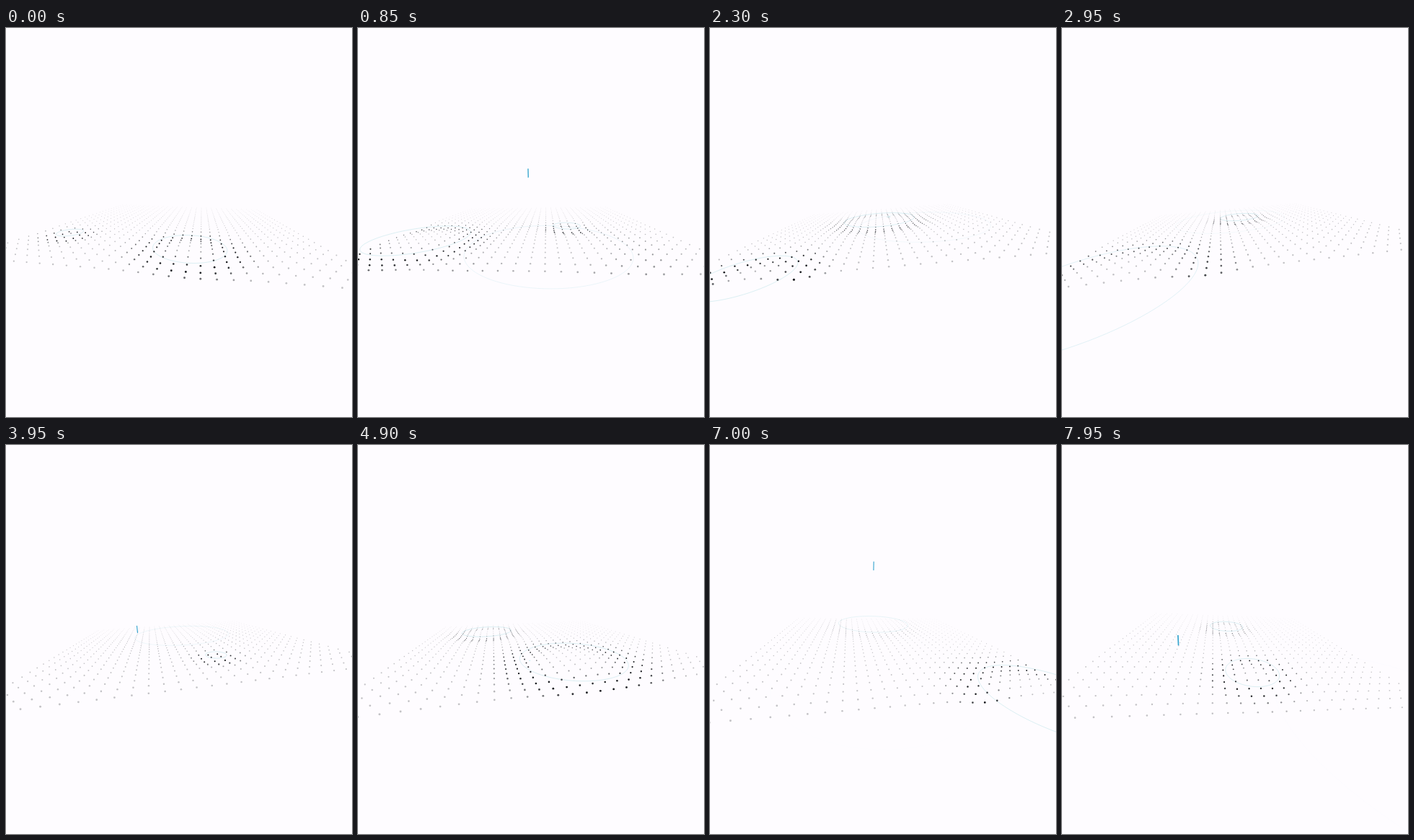
Animation of 480 by 540 pixels, one loop 8 s. Source, as an HTML page with a canvas:

```html
<!DOCTYPE html>
<html lang="en">
<head>
<meta charset="utf-8">
<title>Rain on a dot field</title>
<style>
  html, body { margin: 0; width: 100%; height: 100%; overflow: hidden; background: #fefcff; }
  canvas { display: block; width: 480px; height: 540px; }
</style>
</head>
<body>
<canvas id="stage"></canvas>
<script>
const LOOP = 8000, STEP = 50;
const FOCAL = 250, DISTANCE = 24.5, HALF = 13.5;
const RING_SPEED = 4.2, RING_MAX = 9, WAVE_MAX = 7.5;
const FALL_SPEED = 30, DROP_TOP = 10.3;

// Landing time in seconds, then the place on the field.
const drops = [
  [-.77, 2, 8.6], [-.3, -10.9, 6.7], [.46, 4.6, 1.8], [1.05, -.5, -3],
  [1.6, -9.2, 12.8], [2.24, 1, -4], [3.71, 2.4, 7.7], [3.95, -6, -7.4],
  [4.89, -1.7, 7.7], [5.49, 0, -9.8], [5.87, 10.3, 13.5],
  [7.35, .7, 8.2], [7.3, -.7, -6.3], [7.96, -6.9, 3.1]
].map(([land, a, b]) => ({ land, a, b }));

// Camera tilt (sine of the pitch) and roll over time in seconds.
const times = [0, 1.65, 2.95, 4.9, 5.85, 7, 7.95];
const tilts = [.24, .21, .21, .25, .28, .315, .352];
const rolls = [.02, -.06, -.08, -.015, 0, .045, .07];

const canvas = document.getElementById('stage');
const ctx = canvas.getContext('2d');
const ratio = window.devicePixelRatio || 1;
canvas.width = 480 * ratio;
canvas.height = 540 * ratio;
ctx.scale(ratio, ratio);

const clamp = value => Math.min(1, Math.max(0, value));

function curve(values, t) {
  const last = times.length - 1;
  let i = 0;
  while (i < last - 1 && t > times[i + 1]) i++;
  const slope = k => {
    const lo = Math.max(0, k - 1), hi = Math.min(last, k + 1);
    return (values[hi] - values[lo]) / (times[hi] - times[lo]);
  };
  const span = times[i + 1] - times[i], s = (t - times[i]) / span, r = 1 - s;
  return values[i] * (1 + 2 * s) * r * r + slope(i) * span * s * r * r
    + values[i + 1] * s * s * (3 - 2 * s) - slope(i + 1) * span * s * s * r;
}

function makeCamera(t) {
  const yaw = -.05 - .17 * Math.cos(.5 * (t - 5.9));
  const sinYaw = Math.sin(yaw), cosYaw = Math.cos(yaw);
  const sinTilt = curve(tilts, t), cosTilt = Math.sqrt(1 - sinTilt * sinTilt);
  const roll = curve(rolls, t), sinRoll = Math.sin(roll), cosRoll = Math.cos(roll);
  return (a, b, height = 0) => {
    const right = a * cosYaw - b * sinYaw, near = b * cosYaw + a * sinYaw;
    const depth = DISTANCE - near * cosTilt - height * sinTilt;
    const scale = FOCAL / depth;
    const x = right * scale, y = (near * sinTilt - height * cosTilt) * scale;
    return { x: 240 + x * cosRoll - y * sinRoll, y: 270 + y * cosRoll + x * sinRoll, depth, scale };
  };
}

function drawRing(project, { a, b, radius }) {
  ctx.beginPath();
  let open = false;
  for (let i = 0; i <= 120; i++) {
    const angle = i * Math.PI / 60;
    const p = project(a + radius * Math.cos(angle), b + radius * Math.sin(angle));
    if (p.depth < 1) { open = false; continue; }
    if (open) ctx.lineTo(p.x, p.y); else ctx.moveTo(p.x, p.y);
    open = true;
  }
  ctx.lineWidth = .8;
  ctx.strokeStyle = `rgba(150, 212, 220, ${.42 * clamp((RING_MAX - radius) / 4)})`;
  ctx.stroke();
}

// The wave runs a little ahead of its ring and widens as it goes.
function waveForce({ a, b, radius }, x, y) {
  const offset = (Math.hypot(x - a, y - b) - radius * 1.1) / (1.2 + .17 * radius);
  return Math.exp(-offset * offset) * clamp(radius) * clamp((WAVE_MAX - radius) / 2.5);
}

function drawDots(project, ripples) {
  for (let b = -HALF; b <= HALF; b++) {
    for (let a = -14; a <= 14; a++) {
      let shade = 0, height = 0;
      for (const ripple of ripples) {
        const force = waveForce(ripple, a, b);
        shade = Math.max(shade, force);
        height -= .35 * force;
      }
      const p = project(a, b, height);
      const haze = clamp((46 - p.depth) / 26);
      ctx.fillStyle = `rgba(${20 - 12 * shade}, ${24 - 14 * shade}, ${28 - 14 * shade}, ${haze * (.25 + .7 * shade)})`;
      ctx.beginPath();
      ctx.arc(p.x, p.y, p.scale * (.058 + .012 * shade), 0, 2 * Math.PI);
      ctx.fill();
    }
  }
}

function drawDrop(project, { a, b, land }, t) {
  const height = (land - t) * FALL_SPEED;
  if (height < 0 || height > DROP_TOP) return;
  const foot = project(a, b, height), head = project(a, b, height + 1.25);
  ctx.beginPath();
  ctx.moveTo(foot.x, foot.y);
  ctx.lineTo(head.x, head.y);
  ctx.lineWidth = foot.scale * .14;
  ctx.strokeStyle = `rgba(52, 164, 206, ${clamp((DROP_TOP - height) / 1.5)})`;
  ctx.stroke();
}

function draw(ms) {
  const t = Math.floor(ms % LOOP / STEP) * STEP / 1000;
  const project = makeCamera(t);
  const ripples = drops
    .map(drop => ({ ...drop, radius: (t - drop.land) * RING_SPEED }))
    .filter(({ radius }) => radius > 0 && radius < RING_MAX);
  ctx.fillStyle = '#fefcff';
  ctx.fillRect(0, 0, 480, 540);
  ripples.forEach(ripple => drawRing(project, ripple));
  drawDots(project, ripples);
  drops.forEach(drop => drawDrop(project, drop, t));
}

const start = performance.now();
function tick() {
  draw(performance.now() - start);
  requestAnimationFrame(tick);
}
tick();
</script>
</body>
</html>
```
